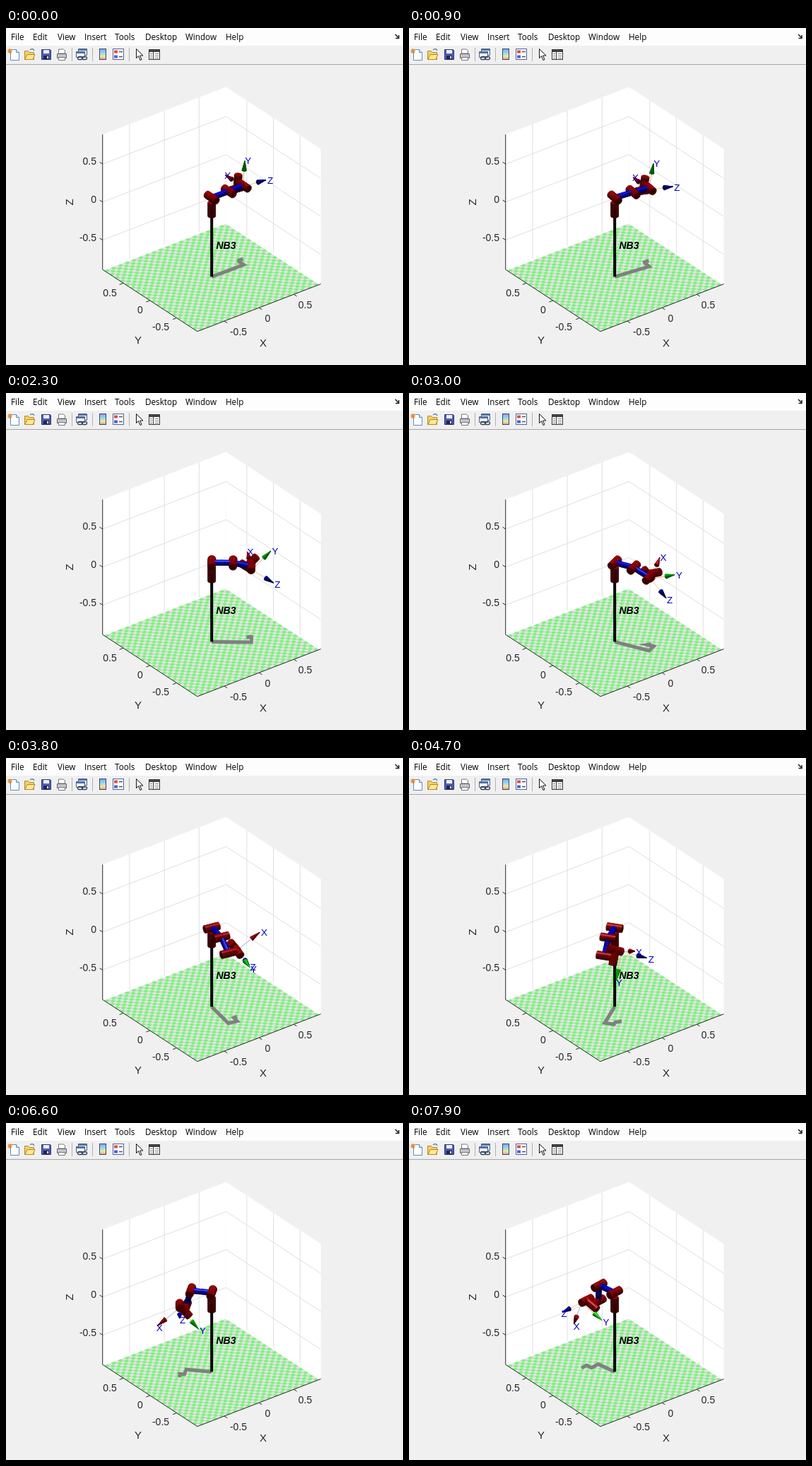
Animation, 562 px wide and 476 px high, one loop 8000 ms. Source, as an HTML page with a canvas:

```html
<!DOCTYPE html>
<html lang="en">
<head>
<meta charset="utf-8">
<title>Robot arm plot</title>
<style>
html, body { margin: 0; width: 100%; height: 100%; overflow: hidden; background: #f0f0f0; }
canvas, svg { position: absolute; left: 0; top: 0; width: 562px; height: 476px; }
text { white-space: pre; }
.menu { font: 11.7px "Open Sans", "Noto Sans", sans-serif; fill: #000; }
.tick { font: 14px "Liberation Sans", Arial, sans-serif; fill: #262626; }
.axis { font: 15px "Liberation Sans", Arial, sans-serif; fill: #262626; text-anchor: middle; }
.name { font: italic bold 14px "Liberation Sans", Arial, sans-serif; }
.dir { font: 13.5px "Liberation Sans", Arial, sans-serif; fill: #0000c0; }
</style>
</head>
<body>
<canvas id="scene" width="562" height="476"></canvas>
<canvas id="robot" width="562" height="476"></canvas>
<svg id="front" viewBox="0 0 562 476">
  <rect width="562" height="25" fill="#fdfdfd"/>
  <path d="M0 51.5H562" stroke="#a6a6a6"/>
  <path d="M551 9l5 5m0-4v4.5h-4.5" fill="none" stroke="#222" stroke-width="1.5"/>
  <path d="M93.5 28V47M122.5 28V47M174.5 28V47" stroke="#b0b0b0"/>
  <!-- new, open, save, print -->
  <path d="M6.500 30.500h8l4 4v11h-12z" fill="#fff" stroke="#5b8db8"/>
  <path d="M14.500 30.500v4h4" fill="#d5e6f5" stroke="#5b8db8"/>
  <path d="M3 30l5 5m0-5l-5 5M5.500 29v7M2 32.500h7" stroke="#e88a2a" stroke-width="1.200"/>
  <path d="M26.500 44.500v-12h5l2 2h6v10z" fill="#f2cf68" stroke="#b58a28"/>
  <path d="M27 44.500l3-7h11l-3 7z" fill="#ffe793" stroke="#b58a28"/>
  <path d="M34 31q4-3 6 1" fill="none" stroke="#4a7fb5" stroke-width="1.300"/>
  <path d="M50.500 30.500h12l1 1v13h-13z" fill="#4f5fae" stroke="#2c3673"/>
  <path d="M53 31h8v5h-8z" fill="#e8eefc"/>
  <path d="M53 39h8v5h-8z" fill="#20264f"/>
  <path d="M58 40h2v3h-2z" fill="#fff"/>
  <path d="M74.500 36v-6h7l2 2v4z" fill="#fff" stroke="#777"/>
  <path d="M72.500 36.500h13v6h-13z" fill="#c3c5cd" stroke="#666"/>
  <path d="M74.500 41.500h9v4h-9z" fill="#fff" stroke="#777"/>
  <!-- link, colour bar, legend -->
  <path d="M102.500 29.500h12v9h-12z" fill="#e6edf6" stroke="#4a5f86"/>
  <path d="M99.500 33.500h12v8h-12z" fill="#f2f6fb" stroke="#4a5f86"/>
  <path d="M103 30h11v2h-11zM100 34h11v2h-11z" fill="#5578b0"/>
  <rect x="101.500" y="40.500" width="7" height="4" rx="2" fill="none" stroke="#39465f" stroke-width="1.400"/>
  <rect x="107.500" y="40.500" width="7" height="4" rx="2" fill="none" stroke="#39465f" stroke-width="1.400"/>
  <linearGradient id="bar" x2="0" y2="1">
    <stop stop-color="#8f9fe8"/><stop offset=".4" stop-color="#8fdcec"/>
    <stop offset=".7" stop-color="#f4e795"/><stop offset="1" stop-color="#ee9b78"/>
  </linearGradient>
  <rect x="132.500" y="29.500" width="9" height="15" fill="url(#bar)" stroke="#35457a"/>
  <rect x="151.500" y="29.500" width="15" height="15" fill="#fff" stroke="#54639a"/>
  <path d="M153 31.500h5v4h-5z" fill="#e04848"/>
  <path d="M153 38.500h5v4h-5z" fill="#4860d8"/>
  <path d="M160 33.500h5M160 40.500h5" stroke="#555" stroke-width="1.500"/>
  <!-- pointer, panel -->
  <path d="M184.500 29.500v13l3-3 2.500 6 2-1-2.500-5.500h4.500z" fill="#fff" stroke="#111"/>
  <rect x="202.500" y="30.500" width="15" height="14" fill="#fff" stroke="#333"/>
  <path d="M203 31h14v3h-14z" fill="#444"/>
  <path d="M208.500 34v10" stroke="#333"/>
  <path d="M204 36.500h3M204 39.500h3M204 42.500h3M211 36.500h5M211 39.500h5M211 42.500h5" stroke="#777"/>
  <text class="axis" transform="translate(94.500 246) rotate(-90)">Z</text>
  <text class="axis" x="187" y="445.500">Y</text>
  <text class="axis" x="364" y="449.500">X</text>
  <text class="name" x="297.500" y="311.500">NB3</text>
</svg>
<script>
const $ = id => document.getElementById(id);
const front = $("front");
const scene = $("scene").getContext("2d");
const robot = $("robot").getContext("2d");

// Orthographic view: azimuth -37.5, elevation 30
const SCALE = 124, LIM = 0.8884;
const AZ = 37.5 * Math.PI / 180;
const CA = Math.cos(AZ), SA = Math.sin(AZ), CE = Math.sqrt(3) / 2;
const EYE = [-SA * CE, -CA * CE, 0.5];
const UP = [0, 0, 1];

const project = ([x, y, z]) => [
  291.2 + SCALE * (CA * x - SA * y),
  256 - SCALE * ((SA * x + CA * y) / 2 + CE * z)
];
const dot = (a, b) => a[0] * b[0] + a[1] * b[1] + a[2] * b[2];
const cross = (a, b) => [
  a[1] * b[2] - a[2] * b[1], a[2] * b[0] - a[0] * b[2], a[0] * b[1] - a[1] * b[0]
];
const unit = v => v.map(c => c / Math.hypot(...v));
// Weighted sum: mix(k1, v1, k2, v2, ...)
function mix(...terms) {
  const out = [0, 0, 0];
  for (let i = 0; i < terms.length; i += 2)
    for (let j = 0; j < 3; j++) out[j] += terms[i] * terms[i + 1][j];
  return out;
}

function path(ctx, points) {
  ctx.beginPath();
  points.forEach(p => ctx.lineTo(...project(p)));
}
function fill(ctx, points, color) {
  path(ctx, points);
  ctx.closePath();
  ctx.fillStyle = color;
  ctx.fill();
}
function line(ctx, points, color, width = 1) {
  path(ctx, points);
  ctx.strokeStyle = color;
  ctx.lineWidth = width;
  ctx.stroke();
}
function addText(cls, x, y, str, anchor = "start") {
  const el = document.createElementNS("http://www.w3.org/2000/svg", "text");
  el.setAttribute("class", cls);
  el.setAttribute("text-anchor", anchor);
  el.setAttribute("x", x);
  el.setAttribute("y", y);
  el.textContent = str;
  front.append(el);
  return el;
}

// Floor square with its near corner at x, y
function tile(x, y, size, color) {
  const z = -LIM;
  fill(scene, [[x, y, z], [x + size, y, z], [x + size, y + size, z], [x, y + size, z]], color);
}

function drawScene() {
  const L = LIM, ticks = [-0.5, 0, 0.5], grid = "#dfdfdf", ink = "#262626";
  fill(scene, [[-L, L, -L], [-L, L, L], [L, L, L], [L, L, -L]], "#fff");
  fill(scene, [[L, -L, -L], [L, -L, L], [L, L, L], [L, L, -L]], "#fff");
  for (const k of ticks) {
    line(scene, [[k, L, -L], [k, L, L]], grid);
    line(scene, [[L, k, -L], [L, k, L]], grid);
    line(scene, [[-L, L, k], [L, L, k], [L, -L, k]], grid);
  }
  tile(-L, -L, 2 * L, "#fff");
  // The checkered floor stops just short of the far edges
  const n = 36, side = 1.75, t = side / n;
  tile(-L, -L, side, "#e0e4e0");
  for (let i = 0; i < n; i++)
    for (let j = (i + 1) % 2; j < n; j += 2) tile(i * t - L, j * t - L, t, "#80f080");
  line(scene, [[-L, L, L], [-L, L, -L], [-L, -L, -L], [L, -L, -L]], ink);
  const d = L + 0.055;
  for (const k of ticks) {
    line(scene, [[k, -L, -L], [k, -d, -L]], ink);
    line(scene, [[-L, k, -L], [-d, k, -L]], ink);
    line(scene, [[-L, L, k], [-L, d, k]], ink);
  }
}

function addLabels() {
  const menu = { File: 7, Edit: 38, View: 73, Insert: 111, Tools: 154, Desktop: 197, Window: 254, Help: 311 };
  for (const name in menu) addText("menu", menu[name], 17, name);
  ["-0.5", "0", "0.5"].forEach((str, i) => {
    addText("tick", 128, [301, 247, 193][i], str, "end");
    addText("tick", [219, 190, 147][i], [427, 403, 379][i], str, "middle");
    addText("tick", [329, 370.5, 423.5][i], [434, 415, 396][i], str, "middle");
  });
}

// Facets of a shaded cylinder, or a cone when the end radius is 0
function tube(list, a, b, r0, r1, color, parts) {
  const n = 20;
  const axis = unit(mix(1, b, -1, a));
  const u = unit(cross(axis, Math.abs(axis[2]) < 0.9 ? UP : [1, 0, 0]));
  const v = cross(axis, u);
  const spoke = i => {
    const w = i / n * 2 * Math.PI;
    return mix(Math.cos(w), u, Math.sin(w), v);
  };
  const at = (i, f) => mix(1 - f, a, f, b, r0 + (r1 - r0) * f, spoke(i));
  const add = (pts, normal) => {
    if (dot(normal, EYE) <= 0) return;
    const mid = pts.reduce((m, p) => mix(1, m, 1 / pts.length, p), [0, 0, 0]);
    list.push({ pts, depth: dot(mid, EYE), color: shade(color, normal) });
  };
  for (let i = 0; i < n; i++)
    for (let k = 0; k < parts; k++) {
      const f = k / parts, g = (k + 1) / parts;
      add([at(i, f), at(i + 1, f), at(i + 1, g), at(i, g)], spoke(i + 0.5));
    }
  const ring = f => Array.from({ length: n }, (_, i) => at(i, f));
  add(ring(0), mix(-1, axis));
  if (r1) add(ring(1), axis);
}

// Overhead light: ambient, diffuse and a soft highlight
function shade(color, n) {
  const lit = Math.max(0, n[2]);
  const shine = lit ? Math.max(0, 2 * lit * dot(n, EYE) - EYE[2]) ** 10 * 0.45 : 0;
  return `rgb(${color.map(c => Math.min(255, Math.round(255 * (c * (0.3 + 0.5 * lit) + shine))))})`;
}

// Joint frames for progress s of the move
function pose(s) {
  const { cos, sin, PI } = Math;
  const q1 = PI * (1 - 1.5 * s), q3 = PI / 2 * s, q5 = PI / 2 * (1 - s);
  const phi = PI / 180 * (4 + 257 * s);
  const x1 = [cos(q1), sin(q1), 0], z1 = [sin(q1), -cos(q1), 0];
  const x4 = mix(cos(phi), x1, sin(phi), UP);
  const z4 = mix(sin(phi), x1, -cos(phi), UP);
  const x5 = mix(cos(q5), x4, sin(q5), z1);
  const z5 = mix(-sin(q5), x4, cos(q5), z1);
  const p1 = mix(0.1519, UP);
  const p2 = mix(1, p1, -0.2437, x1);
  const p3 = mix(1, p2, -0.2133 * cos(q3), x1, -0.2133 * sin(q3), UP);
  const p4 = mix(1, p3, 0.1124, z1);
  const p5 = mix(1, p4, 0.0854, z4);
  const p6 = mix(1, p5, 0.0819, z5);
  return {
    points: [[0, 0, 0], p1, p2, p3, p4, p5, p6],
    axes: [UP, z1, z1, z1, z4, z5],
    tool: [x5, mix(-1, z4), z5]
  };
}

const RED = [0.7, 0, 0], BLUE = [0, 0, 1];
const TOOL = [
  { name: "X", cone: [0.8, 0, 0.05], stem: "#9ab4c4" },
  { name: "Y", cone: [0, 1, 0], stem: "#efa582" },
  { name: "Z", cone: [0, 0, 0.75], stem: "#e6cc86" }
];

function drawRobot(s) {
  const { points, axes, tool } = pose(s);
  const [, shoulder, elbow, wrist, , , tip] = points;
  const facets = [];
  robot.clearRect(0, 0, 562, 476);
  line(robot, points.map(([x, y]) => [x, y, -LIM]), "#808080", 5);
  line(robot, [[0, 0, -LIM], [0, 0, 0]], "#000", 4);

  axes.forEach((axis, i) => {
    const p = points[i];
    tube(facets, mix(1, p, -0.09, axis), mix(1, p, 0.09, axis), 0.044, 0.044, RED, 5);
  });
  tube(facets, shoulder, elbow, 0.03, 0.03, BLUE, 8);
  tube(facets, elbow, wrist, 0.03, 0.03, BLUE, 8);
  TOOL.forEach((t, i) => {
    const along = d => mix(1, tip, d, tool[i]);
    line(robot, [tip, along(0.25)], t.stem);
    tube(facets, along(0.21), along(0.33), 0.026, 0, t.cone, 1);
    const [x, y] = project(along(0.35));
    t.label.setAttribute("x", x.toFixed(1));
    t.label.setAttribute("y", (y + 6).toFixed(1));
  });

  facets.sort((a, b) => a.depth - b.depth);
  for (const f of facets) {
    fill(robot, f.pts, f.color);
    robot.strokeStyle = f.color;
    robot.lineWidth = 0.6;
    robot.stroke();
  }
}

// Smooth quintic move, sampled in steps of a tenth of a second
const ease = u => u * u * u * (10 - 15 * u + 6 * u * u);
const LOOP = 8000, STEP = 100, MOVE = 10200, LEAD = 600;
const start = performance.now();
let shown = -1;
function tick() {
  const step = Math.floor((performance.now() - start) % LOOP / STEP);
  if (step !== shown) {
    shown = step;
    drawRobot(ease((step * STEP + LEAD) / MOVE));
  }
  requestAnimationFrame(tick);
}

drawScene();
addLabels();
for (const t of TOOL) t.label = addText("dir", 0, 0, t.name);
tick();
</script>
</body>
</html>
```
